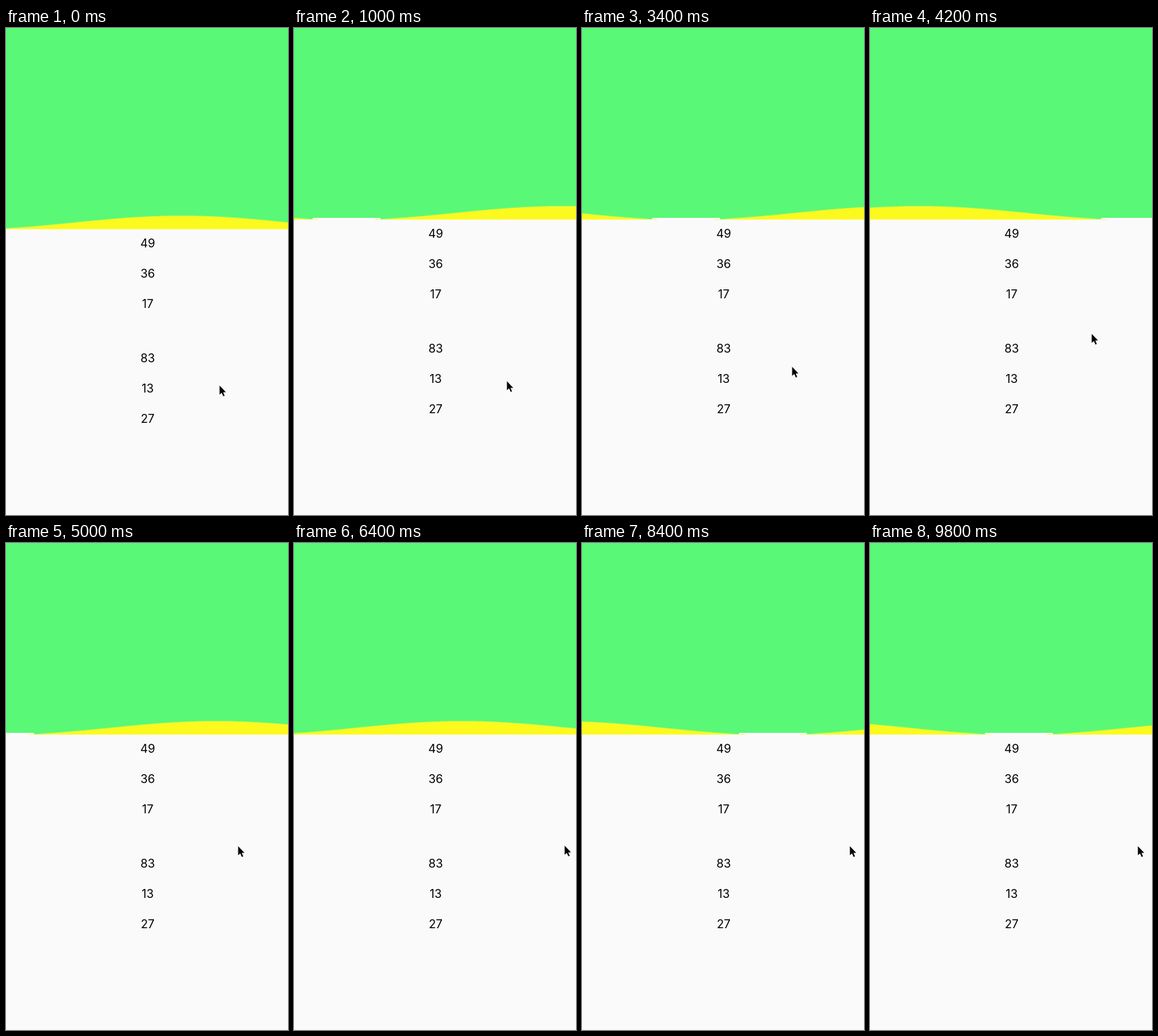
Write an HTML page that moves like this. It is 410 px wide and 708 px high and loops after 10 s.

```html
<!DOCTYPE html>
<html lang="en">
<head>
<meta charset="utf-8">
<title>Wave header</title>
<style>
  html, body { margin: 0; width: 100%; height: 100%; overflow: hidden; background: #fafafa; }
  svg { display: block; width: 410px; height: 708px; }
  text { font: 17px Inter, Roboto, sans-serif; text-anchor: middle; fill: #000; }
</style>
</head>
<body>
<svg viewBox="0 0 410 708">
  <g id="page">
    <path id="crest" fill="#fcfa1e"/>
    <path id="header" fill="#59f877"/>
    <use href="#crest" y="-1" opacity=".5"/>
    <path id="gap" fill="#fff"/>
    <g id="rows"></g>
  </g>
  <path id="cursor" d="M0 0V13.2L3.1 10.4L5.4 15.6L7.4 14.7L5.2 9.7H9.2Z" stroke="#fff" stroke-width="1" paint-order="stroke"/>
</svg>
<script>
const LOOP = 10000, STEP = 200;
const WIDTH = 410, BASE = 278.6, MID = 269.4, AMP = 10, PERIOD = 200 * Math.PI;
const $ = id => document.getElementById(id);
const clamp = v => Math.min(1, Math.max(0, v));
const mix = (a, b, k) => a + (b - a) * k;

// Steady drift to the left, with a short slowdown late in the loop
const troughAt = t => -59 - 0.4925 * t + 75 * clamp((t - 6400) / 2000);

// The overscrolled list springs back
const scrollAt = t => 14 * Math.exp(-t / 100);

const stops = [
  { t: 0, x: 310.5, y: 519.8 },
  { t: 2200, x: 308.5, y: 505.8 },
  { t: 3400, x: 305.5, y: 492.5 },
  { t: 3600, x: 311, y: 447.5 },
  { t: 5000, x: 337.5, y: 440.8 },
  { t: 6400, x: 393.5, y: 440 },
  { t: 7400, x: 389.5, y: 440.8 },
  { t: LOOP, x: 389.5, y: 440.8 }
];

function cursorAt(t) {
  const next = stops.findIndex(stop => stop.t > t);
  const a = stops[next - 1], b = stops[next];
  const k = (t - a.t) / (b.t - a.t);
  return [mix(a.x, b.x, k), mix(a.y, b.y, k)];
}

// Filled area between two edge functions of x
function band(top, bottom) {
  let upper = "", lower = "";
  for (let x = 0; x <= WIDTH; x++) {
    upper += `${x ? "L" : "M"}${x} ${top(x).toFixed(2)}`;
    lower = `L${x} ${bottom(x).toFixed(2)}` + lower;
  }
  return upper + lower + "Z";
}

function drawWave(trough) {
  const offset = x => x - trough - PERIOD * Math.round((x - trough) / PERIOD);
  const within = (x, reach) => Math.abs(offset(x)) < reach;
  const curve = x => Math.min(278, MID + AMP * Math.cos(offset(x) / 100));
  const edge = x => within(x, 49) ? 276 : curve(x);
  const crest = x => within(x, 40) ? BASE : curve(x);
  $("header").setAttribute("d", band(() => -20, edge));
  $("crest").setAttribute("d", band(crest, () => BASE));
  $("gap").setAttribute("d", band(edge, x => within(x, 49) ? crest(x) : edge(x)));
}

// Two groups of three rows
$("rows").innerHTML = [49, 36, 17, 83, 13, 27].map((n, i) =>
  `<text x="206" y="${305 + 44 * i + (i > 2 ? 35 : 0)}">${n}</text>`).join("");

const start = performance.now();
function render() {
  const t = Math.floor((performance.now() - start) % LOOP / STEP) * STEP;
  drawWave(troughAt(t));
  $("page").setAttribute("transform", `translate(0 ${scrollAt(t).toFixed(2)})`);
  $("cursor").setAttribute("transform", `translate(${cursorAt(t)})`);
  requestAnimationFrame(render);
}
render();
</script>
</body>
</html>
```
